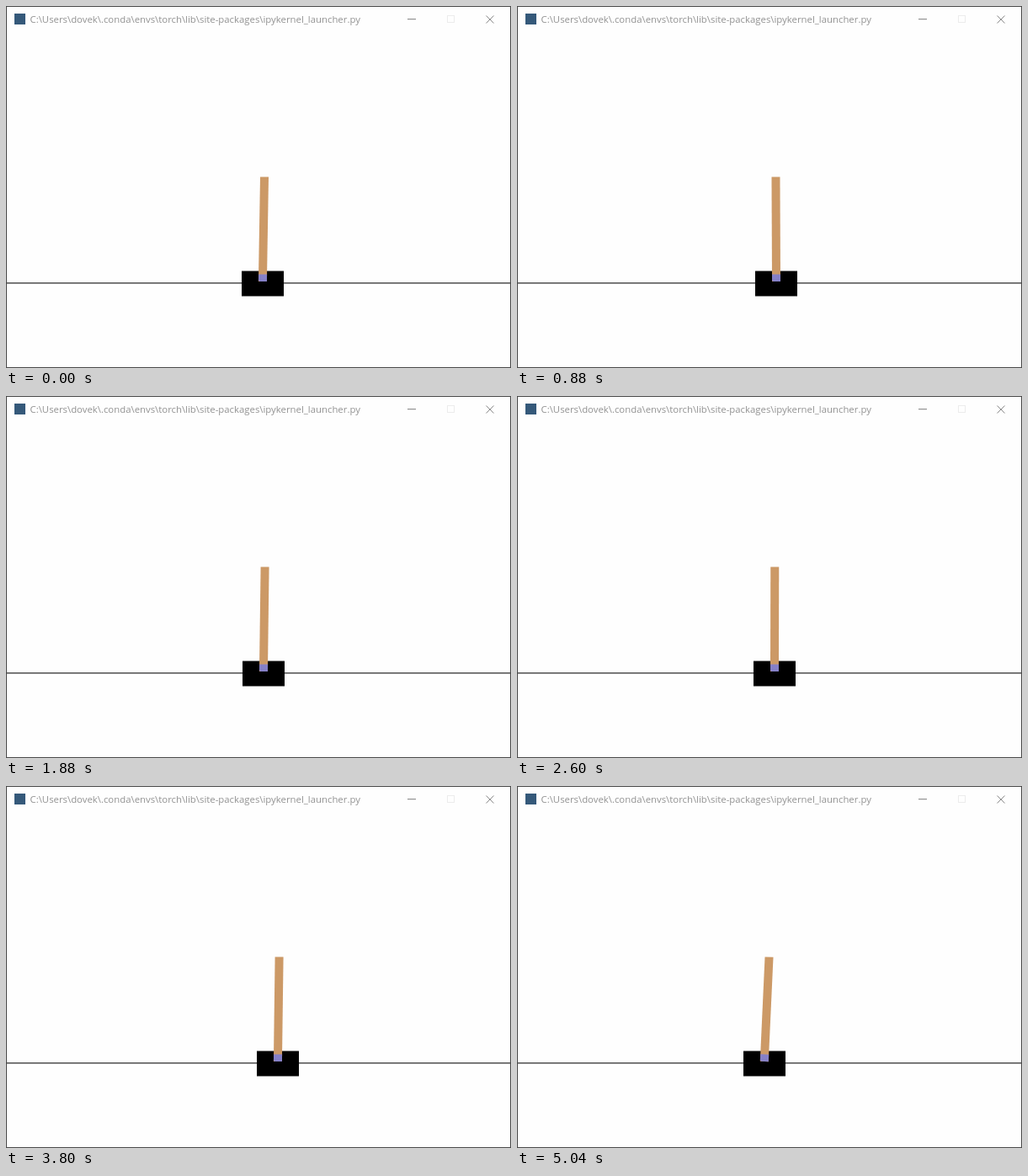
Recreate the animation shown at these times as an HTML page. Size 600 by 431 pixels, loop 5.12 s.

```html
<!DOCTYPE html>
<html lang="en">
<head>
<meta charset="utf-8">
<title>Cart pole</title>
<style>
  html, body { margin: 0; width: 100%; height: 100%; overflow: hidden; background: #fefefe; }
  svg { display: block; width: 600px; height: 431px; }
  text { font: 11.36px "Open Sans", "Noto Sans", sans-serif; fill: #929292; }
</style>
</head>
<body>
<svg viewBox="0 0 600 431">
  <rect width="600" height="431" fill="#fefefe"/>

  <!-- title bar -->
  <rect x="10" y="9" width="13" height="13" fill="#35597a"/>
  <text x="28.5" y="20">C:\Users\dovek\.conda\envs\torch\lib\site-packages\ipykernel_launcher.py</text>
  <g fill="none">
    <path d="M477 15.7h10" stroke="#7c7c7c"/>
    <rect x="524.5" y="11.5" width="8" height="8" stroke="#ececec"/>
    <path d="M570.5 11.5l9 9m0-9l-9 9" stroke="#8c8c8c"/>
  </g>

  <!-- scene -->
  <rect y="329.3" width="600" height="1.2" fill="#222"/>
  <g id="cart">
    <rect x="-25" y="315.5" width="50" height="30"/>
    <g id="pole">
      <rect x="-5" y="203.5" width="10" height="124.5" fill="#cc9966"/>
      <path d="M-5 319.5H5V328H-3.5L-5 327Z" fill="#8580c8"/>
    </g>
  </g>

  <rect x=".5" y=".5" width="599" height="430" fill="none" stroke="#484848"/>
</svg>
<script>
  const LOOP = 5120, STEP = 40, PAUSE = 160, RESET = 5040;
  const AXLE_Y = 324, REACH = 120, SWAY = 2, SWAY_TIME = 384;
  const cart = document.getElementById('cart');
  const pole = document.getElementById('pole');

  // turning points of the cart's drift: time in ms, x
  const drift = [
    [0, 307], [1200, 308], [2600, 306], [3000, 293],
    [3520, 330], [3640, 318], [3960, 331], [RESET, 331]
  ];
  // moments at which the picture stands still for a while
  const pauses = [880, 1200, 2440, 2600, 3640, 3800, 3960, 4880];

  function driftAt(t) {
    const i = drift.findIndex(([time]) => time > t);
    const [t0, x0] = drift[i - 1], [t1, x1] = drift[i];
    const k = (t - t0) / (t1 - t0);
    return x0 + (x1 - x0) * k * k * (3 - 2 * k);
  }

  // the pole sways, and the cart moves against it to keep it up
  function poseAt(time) {
    let t = Math.floor(time / STEP) * STEP;
    if (t >= RESET) return { x: 294, lean: 5.5 };
    t = pauses.findLast(p => t >= p && t < p + PAUSE) ?? t;
    const lean = SWAY * Math.cos(2 * Math.PI * t / SWAY_TIME);
    return { x: Math.round(driftAt(t) - 0.8 * lean), lean };
  }

  const begin = performance.now();

  function draw() {
    const { x, lean } = poseAt((performance.now() - begin) % LOOP);
    const angle = Math.atan(lean / REACH) * 180 / Math.PI;
    cart.setAttribute('transform', `translate(${x} 0)`);
    pole.setAttribute('transform', `rotate(${angle} 0 ${AXLE_Y})`);
    requestAnimationFrame(draw);
  }
  draw();
</script>
</body>
</html>
```
